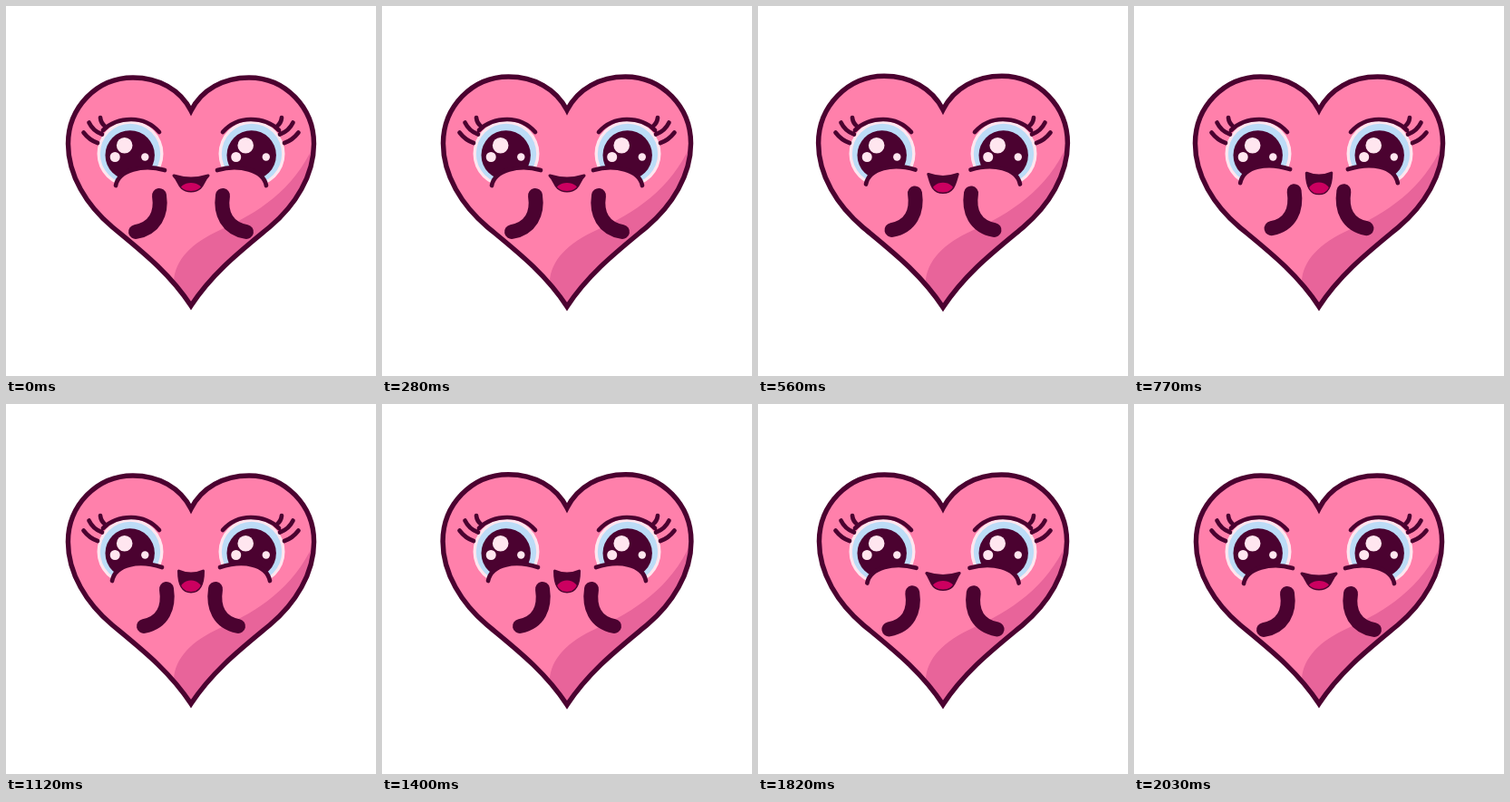
An HTML page that plays this animation: 408x408 px, repeating every 2100 ms.

```html
<!DOCTYPE html>
<html lang="en">
<head>
<meta charset="utf-8">
<title>Happy heart</title>
<style>
  html, body { margin: 0; width: 100%; height: 100%; overflow: hidden; background: #fff; }
  svg { display: block; width: 100vw; height: 100vh; }
  .line { fill: none; stroke: #4b0230; stroke-width: 4.7; stroke-linecap: round; stroke-linejoin: round; }
  .outline { stroke-width: 5.4; stroke-linejoin: miter; }
  .arm { stroke-width: 16; }
  .dark { fill: #4b0230; }
  .pink { fill: #ff80ab; }
  .shine { fill: #ffe6ef; }
</style>
</head>
<body>
<svg viewBox="0 0 408 408">
  <defs>
    <path id="shape" d="M204 115.5C192 92 168 79 140 79C100 79 68.5 112 68.5 152C68.5 187 89 220 117 243.5C149 270 180 294 204 330.5C228 294 259 270 291 243.5C319 220 339.5 187 339.5 152C339.5 112 308 79 268 79C240 79 216 92 204 115.5Z"/>
    <clipPath id="heartClip"><use href="#shape"/></clipPath>
    <clipPath id="mouthClip"><path class="mouth"/></clipPath>
    <g id="eye">
      <circle cx="137" cy="163" r="36.5" class="shine"/>
      <circle cx="137" cy="163" r="33.2" fill="#bcdcf7"/>
      <circle cx="136.7" cy="164.5" r="27.2" class="dark"/>
    </g>
    <g id="shines" class="shine">
      <circle cx="130.7" cy="153.7" r="8.8"/>
      <circle cx="120.2" cy="166.5" r="5.5"/>
      <circle cx="153.3" cy="166.5" r="4.2"/>
    </g>
    <g id="side">
      <path class="cheek pink"/>
      <path class="cheekLine line"/>
      <path class="line" d="M107 137C115 129 126 125 138 125C150 125 161 130 169 139M85.5 139.5Q92 148 101 151M91.5 128.5Q96 138 106 141.5M104 123Q104.5 129 109.5 133"/>
      <path class="arm line"/>
    </g>
  </defs>
  <g id="heart">
    <use href="#shape" class="pink"/>
    <path clip-path="url(#heartClip)" fill="#e8649a" d="M339 154C317 203 278 228 236 247C205 261 186 280 185 304L204 340L350 340V154Z"/>
    <use href="#shape" class="line outline"/>
  </g>
  <use href="#eye"/>
  <use href="#eye" x="134"/>
  <use href="#shines"/>
  <use href="#shines" x="133.5"/>
  <use href="#side"/>
  <use href="#side" transform="matrix(-1 0 0 1 408 0)"/>
  <path class="mouth dark" stroke="#4b0230" stroke-width="3" stroke-linejoin="round"/>
  <ellipse id="tongue" cx="204" rx="13.5" fill="#cc0060" clip-path="url(#mouthClip)"/>
</svg>
<script>
const LOOP = 2100, STEP = 70;
const find = selector => document.querySelector(selector);
const mix = (a, b, p) => a + (b - a) * p;
const ease = x => {
  const u = Math.min(1, Math.max(0, x));
  return u * u * (3 - 2 * u);
};
const setPath = (selector, d) =>
  document.querySelectorAll(selector).forEach(el => el.setAttribute('d', d));

function draw(t) {
  // The heart beats twice per loop; the face squeezes in once.
  const scale = 1 + 0.007 * (1 - Math.cos(4 * Math.PI * t / LOOP));
  find('#heart').setAttribute('transform',
    `translate(204 205) scale(${scale}) translate(-204 -205)`);

  const p = ease((t - 280) / 560) - ease((t - 1400) / 560);
  const m = (a, b) => mix(a, b, p);

  const cheek = `M${m(121, 117)} ${m(198, 195)}C${m(124, 121)} ${m(181, 176)} ${m(151, 147)} ${m(174, 172)} ${m(175, 172)} ${m(181, 180)}`;
  setPath('.cheekLine', cheek);
  setPath('.cheek', `${cheek}V204H${m(121, 117)}Z`);

  setPath('.arm', `M${m(169, 177)} ${m(209, 204)}c3 20 ${m(-5, -4)} ${m(36, 37)} ${m(-26, -25)} ${m(40, 41)}`);

  const w = m(19, 13.5), y = m(187, 184), b = m(204, 207);
  const side = w - m(6, 0), sideY = y + m(5, 12), bowl = m(14, 11);
  setPath('.mouth', `M${204 - w} ${y}Q204 ${y + 6} ${204 + w} ${y}C${204 + side} ${sideY} ${204 + bowl} ${b} 204 ${b}C${204 - bowl} ${b} ${204 - side} ${sideY} ${204 - w} ${y}Z`);
  const tongue = find('#tongue');
  tongue.setAttribute('cy', b + 1);
  tongue.setAttribute('ry', m(10, 13.5));
}

function tick() {
  const t = performance.now() % LOOP;
  draw(Math.floor(t / STEP) * STEP);
  requestAnimationFrame(tick);
}
tick();
</script>
</body>
</html>
```
